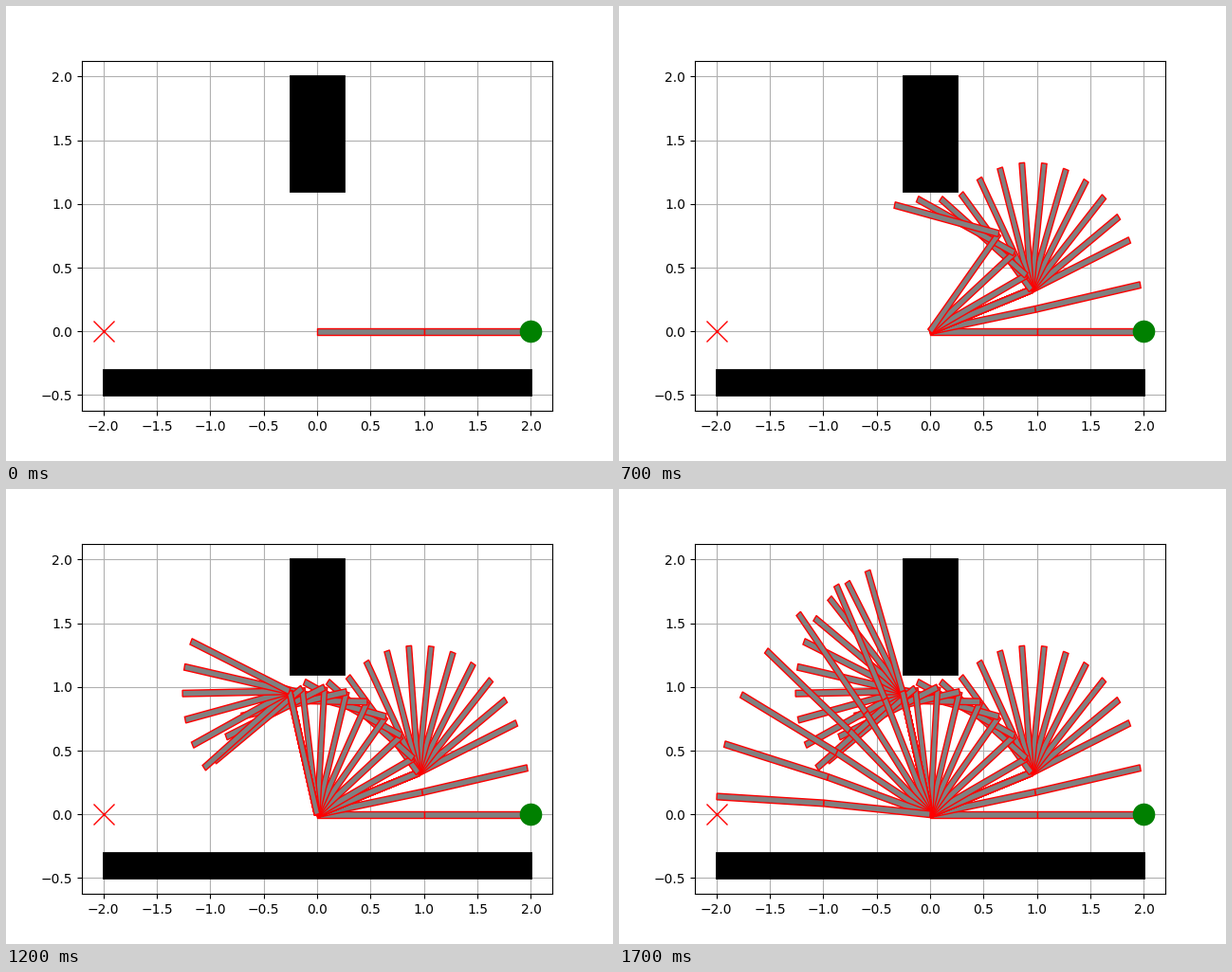
A matplotlib script that plays this animation: 640x480 px, repeating every 1750 ms.

```python
import numpy as np
import matplotlib.pyplot as plt
from matplotlib.animation import FuncAnimation
from matplotlib.patches import Polygon, Rectangle

FRAMES = 35
INTERVAL = 50
STEP = 12          # degrees of joint travel per frame
HALF_WIDTH = 0.025

# Corners of the path through joint space (degrees): one joint turns at a time.
CORNERS = np.array([(0, 0), (0, 1), (19, 1), (19, 117),
                    (105, 117), (105, 2), (180, 2), (180, 0)])
TRAVEL = np.concatenate([[0], np.abs(np.diff(CORNERS, axis=0)).sum(axis=1).cumsum()])


def joints(n):
    """Joint angles in radians at step n."""
    s = max(0, STEP * n - 1)
    return [np.radians(np.interp(s, TRAVEL, CORNERS[:, k])) for k in (0, 1)]


def link(start, angle):
    """Unit-length bar from start, and its end point."""
    along = np.array([np.cos(angle), np.sin(angle)])
    side = HALF_WIDTH * np.array([-along[1], along[0]])
    end = start + along
    bar = Polygon([start - side, end - side, end + side, start + side],
                  closed=True, facecolor="gray", edgecolor="red",
                  linewidth=1, zorder=2, visible=False)
    return bar, end


def make_arm(n):
    q1, q2 = joints(n)
    lower, elbow = link(np.zeros(2), q1)
    upper, _ = link(elbow, q1 + q2)
    return lower, upper


fig, ax = plt.subplots(figsize=(6.4, 4.8), dpi=100)
ax.set_xlim(-2.2, 2.2)
ax.set_ylim(-0.625, 2.125)
ax.grid(True)
ax.set_axisbelow(True)

for x, y, w, h in [(-0.25, 1.1, 0.5, 0.9), (-2, -0.5, 4, 0.2)]:
    ax.add_patch(Rectangle((x, y), w, h, facecolor="black",
                           edgecolor="black", linewidth=2, zorder=2))

ax.plot(2, 0, "o", color="green", markersize=16, zorder=3)
ax.plot(-2, 0, "x", color="red", markersize=16, zorder=3)

arms = [make_arm(n) for n in range(FRAMES)]
for arm in arms:
    for bar in arm:
        ax.add_patch(bar)


def update(frame):
    """Show every pose up to this one."""
    for n, arm in enumerate(arms):
        for bar in arm:
            bar.set_visible(n <= frame)
    return [bar for arm in arms for bar in arm]


anim = FuncAnimation(fig, update, frames=FRAMES, init_func=lambda: update(0),
                     interval=INTERVAL, repeat=True, repeat_delay=0, blit=False)
plt.show()
```
